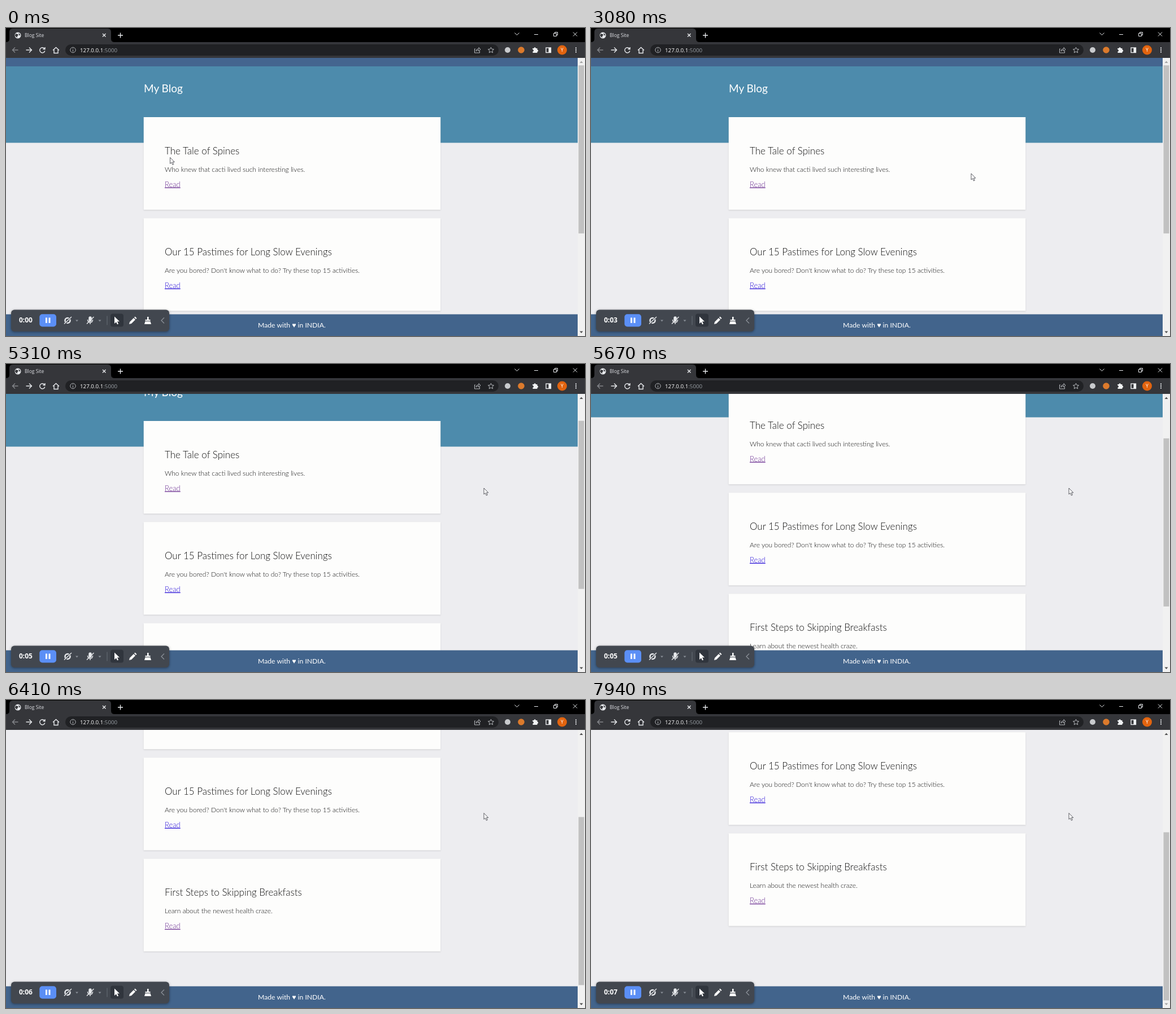
Write an HTML page that moves like this. It is 1025 by 546 pixels and loops after 8 s.

```html
<!DOCTYPE html>
<html lang="en">
<head>
<meta charset="utf-8">
<title>Blog Site</title>
<style>
html, body { margin: 0; width: 100%; height: 100%; overflow: hidden; background: #000; }
svg { display: block; width: 1025px; height: 546px; font-family: Lato, sans-serif; }
.ui { font-family: "Open Sans", sans-serif; }
.line { fill: none; stroke: #e8eaed; stroke-width: 1.4; }
.thin { stroke-width: 1; }
.card { fill: #fdfdfc; filter: drop-shadow(0 1px 1px #0002); }
.title { font-size: 17px; font-weight: 300; fill: #111; }
.body { font-size: 12px; font-weight: 300; fill: #111; }
.link { font-size: 13px; font-weight: 300; text-decoration: underline; }
</style>
</head>
<body>
<svg viewBox="0 0 1025 546">
  <defs><clipPath id="view"><rect y="53" width="1012" height="493"/></clipPath></defs>

  <rect y="53" width="1012" height="493" fill="#ededf0"/>
  <g clip-path="url(#view)">
    <g id="page">
      <rect y="53" width="1012" height="15" fill="#44658f"/>
      <rect y="68" width="1012" height="135.500" fill="#4d8bac"/>
      <text x="244" y="114" font-size="19" fill="#fff">My Blog</text>
    </g>
    <rect y="507.500" width="1012" height="39" fill="#42648c"/>
    <text x="506" y="531" font-size="12.200" fill="#fff" text-anchor="middle">Made with ♥ in INDIA.</text>
  </g>

  <!-- scrollbar -->
  <rect x="1012" y="53" width="13" height="493" fill="#f1f1f1"/>
  <rect id="thumb" x="1013.500" y="66" width="10" height="298" fill="#c1c1c1"/>
  <path id="up" d="M1015.500 62l3-3.500 3 3.500z"/>
  <path id="down" d="M1015.500 537.500l3 3.500 3-3.500z"/>

  <!-- browser window -->
  <rect width="1025" height="53" fill="#000"/>
  <path d="M0 25q6 0 6-6V7q0-6 6-6H180q6 0 6 6V19q0 6 6 6H1025V53H0z" fill="#35363a"/>
  <circle cx="21" cy="13" r="5.500" fill="#e8eaed"/>
  <path d="M17 10l4 1 1 2-2 1v3l-4-3zM22 9l3 2v3l-2-2z" fill="#35363a"/>
  <g class="ui">
    <text x="33" y="16" font-size="8.500" fill="#dfe1e5">Blog Site</text>
    <rect x="105" y="29" width="767" height="20" rx="10" fill="#202124"/>
    <text x="131" y="42.700" font-size="9.750" fill="#9aa0a6"><tspan fill="#fff">127.0.0.1</tspan>:5000</text>
  </g>
  <g class="line">
    <path d="M171 10l5.500 5.500M176.500 10l-5.500 5.500M198 13h9M202.500 8.500v9"/>
    <path class="thin" d="M900.500 8.500l4 4 4-4M935 11.500h7M969.500 9.500h5v5h-5zM971.500 9.500v-2h5v5h-2M1004 7.500l7 7M1011 7.500l-7 7"/>
    <path d="M21.500 39h-9.500M16 34.500L11.500 39l4.500 4.500" stroke="#85878b"/>
    <path d="M35.500 39h9.500M41 34.500l4.500 4.500-4.500 4.500"/>
    <path d="M68 36.500a4.600 4.600 0 1 0 .800 4M69 34v3.500h-3.500"/>
    <path d="M83 39.500l5.500-5 5.500 5M85 38.500v6h7v-6"/>
    <g class="thin" stroke="#b5b8bc">
      <circle cx="118.500" cy="39" r="4.700"/><path d="M118.500 36v1.200M118.500 38.500v3.500"/>
      <path d="M831 37h-1.500v7h9v-3M832 41q0-4 5-4v-2.500l3 3.500-3 3.200V39q-3 0-5 2z"/>
      <path d="M858.500 34.200l1.500 3.200 3.600.400-2.700 2.400.800 3.600-3.200-1.900-3.200 1.900.800-3.600-2.700-2.400 3.600-.400z"/>
    </g>
    <rect x="956" y="35" width="8.500" height="8.500"/>
  </g>
  <circle cx="888" cy="39" r="5" fill="#c9cbce"/>
  <circle cx="912" cy="39" r="5.800" fill="#dc7a2c"/>
  <path d="M932 36h2.500a1.700 1.700 0 0 1 3.400 0h2.600v2.500a1.700 1.700 0 0 1 0 3.400V44h-8v-2.500a1.600 1.600 0 0 0 0-3.200z" fill="#f1f3f4"/>
  <rect x="960.500" y="35" width="4" height="8.500" fill="#f1f3f4"/>
  <circle cx="984.500" cy="39" r="8.500" fill="#e2640f"/>
  <text class="ui" x="984.500" y="42" font-size="8.500" fill="#fff" text-anchor="middle">Y</text>
  <path d="M1009 34.500v9" stroke="#e8eaed" stroke-width="2" stroke-dasharray="2 1.500"/>

  <!-- recorder panel -->
  <rect x="9" y="499.500" width="280" height="38.500" rx="6" fill="#42474f" style="filter:drop-shadow(0 1px 2px #0006)"/>
  <text id="clock" class="ui" x="35" y="522.300" font-size="12" font-weight="700" fill="#fff" text-anchor="middle"></text>
  <rect x="59.300" y="507.300" width="29.700" height="22.200" rx="5" fill="#5b8ff6"/>
  <path d="M70 513.500h3v9.500h-3zM75.500 513.500h3v9.500h-3z" fill="#fff"/>
  <rect x="185" y="506.500" width="23" height="23" rx="4" fill="#30353d"/>
  <g class="line">
    <circle cx="109" cy="518.500" r="4.500" stroke-width="2.500"/>
    <path d="M103.500 525l12-13" stroke="#42474f" stroke-width="3"/>
    <path d="M103 524.500l13-12.500"/>
    <rect x="147" y="512" width="4" height="8" rx="2" fill="#e8eaed"/>
    <path d="M144.500 517q0 5 4.500 5t4.500-5M149 522v3"/>
    <path d="M143 524.500l12.500-12.500"/>
    <path d="M179 510.500v16" stroke="#5d636c"/>
    <path d="M280 513.500l-5 5 5 5" stroke="#888e96"/>
  </g>
  <path d="M123 517.500h5l-2.500 3zM163.500 517.500h5l-2.500 3z" fill="#888e96"/>
  <path d="M192 511.500v12.500l3-2.800 2 4.300 2-1-2-4.200h4z" fill="#fff"/>
  <path d="M218 525l1-4 7-7 3 3-7 7zM227 513l1.500-1.500 3 3L230 516z" fill="#fff"/>
  <path d="M250 512h2.500v5h3v2h-9v-2h3.500zM246.500 520h9l1.500 5h-12z" fill="#fff"/>

  <path id="pointer" d="M0 0v11l2.500-2.300 1.900 4.300 1.900-.900-1.900-4h3.400z" fill="#fff" stroke="#33343c" stroke-width=".8"/>
</svg>
<script>
const $ = id => document.getElementById(id);
const LOOP = 8000, MAX_SCROLL = 280;
const posts = [
  ['The Tale of Spines', 'Who knew that cacti lived such interesting lives.', '#6b2f91'],
  ['Our 15 Pastimes for Long Slow Evenings', "Are you bored? Don't know what to do? Try these top 15 activities.", '#2c14d8'],
  ['First Steps to Skipping Breakfasts', 'Learn about the newest health craze.', '#6b2f91']
];
$('page').innerHTML += posts.map(([title, body, color], i) => `
  <g transform="translate(244 ${158 + i * 179.2})">
    <rect class="card" x="-.3" width="525.6" height="164.2"/>
    <text class="title" x="37" y="65.500">${title}</text>
    <text class="body" x="37" y="96.500">${body}</text>
    <text class="link" x="37" y="123.500" fill="${color}">Read</text>
  </g>`).join('');

const smooth = u => u * u * (3 - 2 * u);
const linear = u => u;
const easeOut = u => 1 - (1 - u) ** 2;

// Each key is [time, value, easing towards it].
function track(keys, t) {
  const i = keys.findIndex(k => k[0] > t);
  if (i < 0) return keys.at(-1)[1];
  if (i === 0) return keys[0][1];
  const [t0, a] = keys[i - 1], [t1, b, ease = smooth] = keys[i];
  return a + (b - a) * ease((t - t0) / (t1 - t0));
}

const pointerX = [[230, 290.5], [1670, 204], [3080, 673], [4700, 846]];
const pointerY = [[230, 229.5], [1670, 82], [3080, 258], [4700, 220], [6140, 220], [6380, 200.5]];
const scrollY = [[4910, 0], [4940, 4, linear], [5670, 109, linear], [6270, 220, linear], [6410, 235, easeOut],
  [6740, 235], [7400, MAX_SCROLL, easeOut]];

function draw(now) {
  const t = now % LOOP;
  const y = track(scrollY, t);
  $('page').setAttribute('transform', `translate(0 ${-Math.round(y)})`);
  $('thumb').setAttribute('y', 66.2 + y * 0.601);
  $('up').setAttribute('fill', y > 0 ? '#505050' : '#a3a3a3');
  $('down').setAttribute('fill', y < MAX_SCROLL ? '#505050' : '#a3a3a3');
  $('pointer').setAttribute('transform', `translate(${track(pointerX, t)} ${track(pointerY, t)})`);
  $('clock').textContent = '0:0' + Math.max(0, Math.floor((t - 30) / 1000));
  requestAnimationFrame(draw);
}
draw(performance.now());
</script>
</body>
</html>
```
